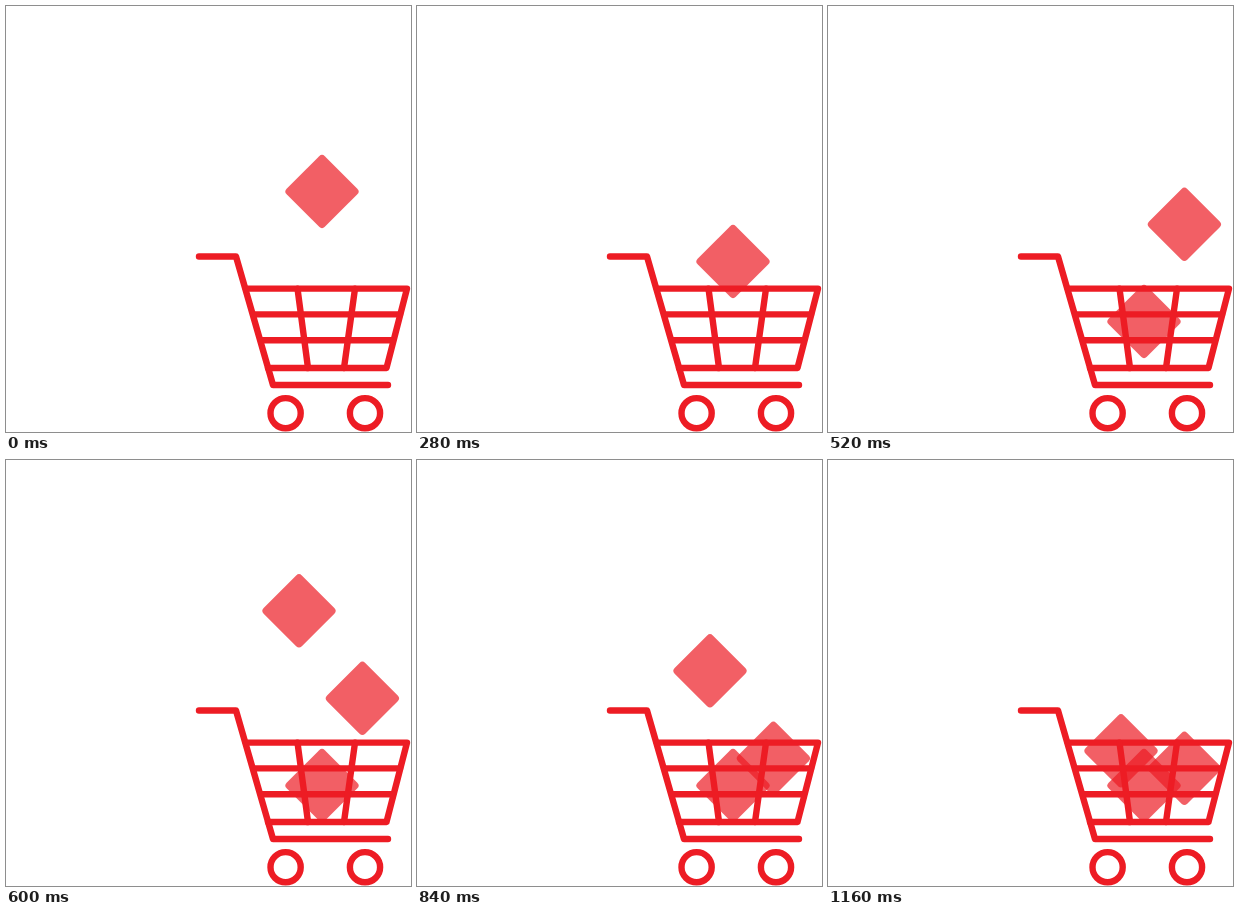
Write an HTML page that moves like this. It is 405 px wide and 426 px high and loops after 1.2 s.

```html
<!DOCTYPE html>
<html lang="en">
<head>
<meta charset="utf-8">
<title>Shopping cart</title>
<style>
  html, body { margin: 0; width: 100%; height: 100%; overflow: hidden; background: #fff; }
  svg { display: block; width: 100%; height: 100%; }
  .cart { fill: none; stroke: #ed1c24; stroke-width: 6.4; stroke-linecap: round; stroke-linejoin: round; }
  .item { fill: #ed1c24; fill-opacity: .7; }
</style>
</head>
<body>
<svg viewBox="0 0 405 426">
  <defs>
    <rect id="box" x="-27" y="-27" width="54" height="54" rx="4" transform="rotate(45)"/>
  </defs>
  <use class="item" href="#box"/>
  <use class="item" href="#box"/>
  <use class="item" href="#box"/>
  <g class="cart">
    <path d="M193 250.5H230L267 379H382"/>
    <path d="M240 282.6H401L380.5 362H262"/>
    <path d="M248 308.4H394M255 334.2H387"/>
    <path d="M291.5 282.6L302 362M349 282.6L338 362"/>
    <circle cx="279.6" cy="407.2" r="15.1"/>
    <circle cx="359" cy="407.2" r="15.1"/>
  </g>
</svg>
<script>
  const LOOP = 1200, STEP = 40, FALL_STEPS = 14, SPEED = 10;
  const drops = [
    { x: 316, y: 185.5, start: 0 },
    { x: 356.4, y: 168.3, start: 8 },
    { x: 293, y: 150.8, start: 15 }
  ];
  const items = document.querySelectorAll('.item');

  function draw(now) {
    const tick = Math.floor((now % LOOP) / STEP);
    drops.forEach(({ x, y, start }, i) => {
      const fallen = Math.min(tick - start, FALL_STEPS) * SPEED;
      items[i].setAttribute('visibility', tick < start ? 'hidden' : 'visible');
      items[i].setAttribute('transform', `translate(${x} ${y + fallen})`);
    });
  }

  let origin;
  function frame(now) {
    origin ??= now;
    draw(now - origin);
    requestAnimationFrame(frame);
  }
  draw(0);
  requestAnimationFrame(frame);
</script>
</body>
</html>
```
